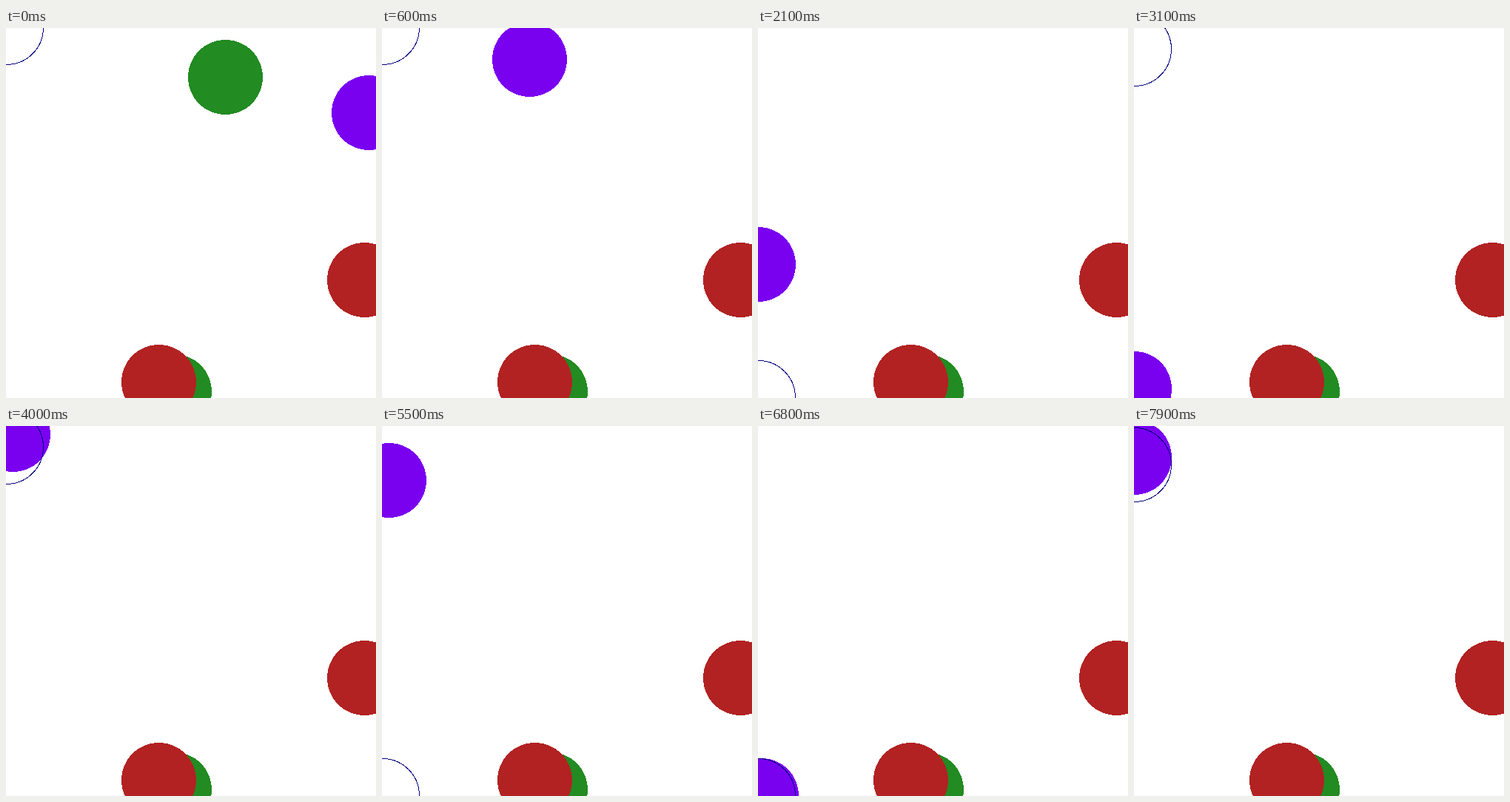
Recreate the animation shown at these times as an HTML page. Size 500x500 px, loop 8 s.

```html
<!DOCTYPE html>
<html>
<head>
<meta charset="utf-8">
<style>
html, body { margin: 0; width: 100%; height: 100%; overflow: hidden; background: #fff; }
svg { display: block; }
</style>
</head>
<body>
<svg width="500" height="500" shape-rendering="crispEdges">
  <g fill="#228b22">
    <circle cx="227.5" cy="491.5" r="50.5"/>
    <circle id="food" cx="296.5" cy="66.5" r="50.5"/>
  </g>
  <g fill="#b22222">
    <circle cx="206.5" cy="478.5" r="50.5"/>
    <circle cx="484.5" cy="340.5" r="50.5"/>
  </g>
  <circle id="agent" r="50.5" fill="#7a00f0"/>
  <circle id="goal" cx="0.5" r="50" fill="none" stroke="#000080"/>
</svg>
<script>
const LOOP = 8000, STEP = 100;
const [food, agent, goal] = ['food', 'agent', 'goal'].map(id => document.getElementById(id));

// [time, x, y] of the moving disc
const path = [
  [0, 490, 114], [900, 53, 6], [1000, 5, -1], [1100, 0, -1], [1200, 0, -1],
  [1500, 0, 124], [1800, 0, 235], [2200, 0, 347], [2700, 0, 447], [3100, 0, 487],
  [3300, 2, 433], [3600, 4, 276], [4000, 9, 11], [4100, 10, -1], [4500, 15, 60],
  [4900, 14, 28], [5200, 12, 6], [5400, 10, 42], [5500, 9, 73], [5700, 8, 167],
  [6200, 5, 494], [6300, 4, 499], [6900, 4, 499], [7000, 4, 487], [7200, 3, 435],
  [7400, 2, 343], [7900, 0, 42]
];
// [time, y] at which the ring jumps
const goals = [[0, -0.5], [1100, 499.5], [3000, 28.5], [5200, 499.5], [6900, 52.5]];

function place(t) {
  const i = Math.max(1, path.findIndex(p => p[0] >= t));
  const a = path[i - 1], b = path[i];
  const k = (t - a[0]) / (b[0] - a[0]);
  return [1, 2].map(n => Math.round(a[n] + (b[n] - a[n]) * k) + 0.5);
}

function draw(now) {
  const t = Math.floor(now % LOOP / STEP) * STEP;
  const [x, y] = place(t);
  agent.setAttribute('cx', x);
  agent.setAttribute('cy', y);
  goal.setAttribute('cy', goals.filter(g => g[0] <= t).pop()[1]);
  food.setAttribute('visibility', t < 400 ? 'visible' : 'hidden');
}

const start = performance.now();
function frame() {
  draw(performance.now() - start);
  requestAnimationFrame(frame);
}
frame();
</script>
</body>
</html>
```
